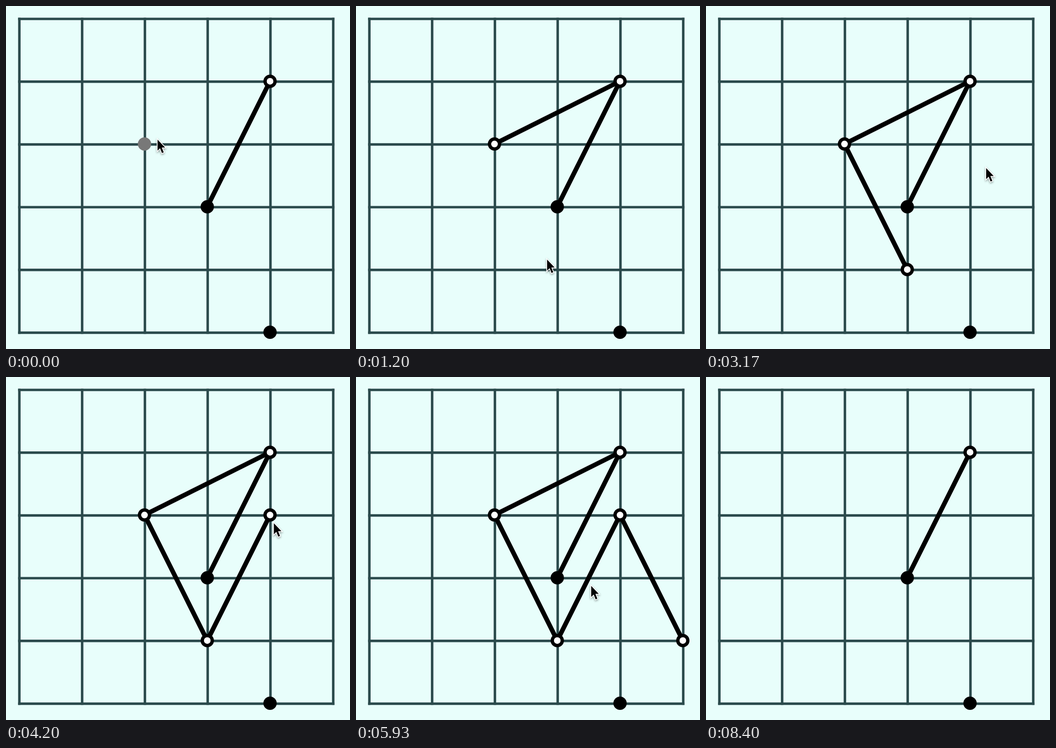
Write an HTML page with a canvas that moves like this. It is 749 px wide and 747 px high and loops after 8.71 s.

```html
<!DOCTYPE html>
<html lang="en">
<head>
<meta charset="utf-8">
<title>Knight path</title>
<style>
  html, body { margin: 0; width: 100%; height: 100%; overflow: hidden; background: #e8fefb; }
  canvas { display: block; }
</style>
</head>
<body>
<canvas id="stage" width="749" height="747"></canvas>
<script>
const ctx = document.getElementById('stage').getContext('2d');
const WIDTH = 749, HEIGHT = 747, LOOP = 8710;
const CELL = 136.68, DOT = 14.5, HOVER_LEAD = 250;
const COLORS = { back: '#e8fefb', grid: '#2b4a4c', hover: '#787878', undo: '#ff6b6b' };

const point = (x, y) => ({ x, y });
const node = (col, row) => point(28.2 + col * CELL, 27.2 + row * CELL);
const near = (p, dy = 3) => point(p.x + 1, p.y + dy);
const start = node(3, 3), first = node(4, 1), goal = node(4, 5);

// Moves light up shortly before the pointer arrives and are placed on click.
const moves = [
  { ...node(2, 2), arrive: 250, click: 420 },
  { ...node(3, 4), arrive: 1500, click: 1900 },
  { ...node(4, 2), arrive: 3670, click: 4000 },
  { ...node(5, 4), arrive: 5300, click: 5420 }
];
const undo = { arrive: 6980, click: 7330 };

// The pointer eases from stop to stop along arcs, resting in between.
const straight = point(0, 0);
const legs = [
  { leave: 0, arrive: moves[0].arrive, to: near(moves[0]), bend: straight },
  { leave: 450, arrive: moves[1].arrive, to: near(moves[1]), bend: point(6, 46) },
  { leave: 1930, arrive: moves[2].arrive, to: near(moves[2]), bend: point(96, -8) },
  { leave: 4030, arrive: moves[3].arrive, to: near(moves[3]), bend: point(3, 7) },
  { leave: 5700, arrive: 6000, to: point(481, 436), bend: straight },
  { leave: 6000, arrive: undo.arrive, to: near(first, 10), bend: straight },
  { leave: 7350, arrive: 7670, to: point(756, 74), bend: straight }
];
const pointerGone = legs[legs.length - 1].arrive;

function pointerAt(time) {
  let pos = point(330, 291);
  for (const { leave, arrive, to, bend } of legs) {
    if (time <= leave) break;
    const u = Math.min(1, (time - leave) / (arrive - leave));
    const s = u * u * (3 - 2 * u), arc = 4 * s * (1 - s);
    pos = point(pos.x + (to.x - pos.x) * s + bend.x * arc,
                pos.y + (to.y - pos.y) * s + bend.y * arc);
  }
  return pos;
}

function line(a, b, color, width) {
  ctx.strokeStyle = color;
  ctx.lineWidth = width;
  ctx.beginPath();
  ctx.moveTo(a.x, a.y);
  ctx.lineTo(b.x, b.y);
  ctx.stroke();
}

function disc(p, radius, color) {
  ctx.fillStyle = color;
  ctx.beginPath();
  ctx.arc(p.x, p.y, radius, 0, Math.PI * 2);
  ctx.fill();
}

function ring(p, fill) {
  disc(p, DOT, '#000');
  disc(p, DOT / 2, fill);
}

function drawGrid() {
  const width = 5.4, low = 29.1, high = low + 5 * CELL, half = width / 2;
  for (let at = low; at < high + 1; at += CELL) {
    line(point(at, low - 1 - half), point(at, high - 1 + half), COLORS.grid, width);
    line(point(low - half, at - 1), point(high + half, at - 1), COLORS.grid, width);
  }
}

const arrow = new Path2D('M0 0V24L5.4 18.8L9.6 29.3L13.4 27.7L9.2 17.3H16.4Z');

function drawPointer({ x, y }) {
  ctx.save();
  ctx.translate(x, y);
  ctx.shadowColor = 'rgba(0,0,0,.4)';
  ctx.shadowBlur = 4;
  ctx.shadowOffsetY = 2;
  ctx.strokeStyle = '#fff';
  ctx.lineWidth = 3.4;
  ctx.stroke(arrow);
  ctx.shadowColor = 'transparent';
  ctx.fillStyle = '#000';
  ctx.fill(arrow);
  ctx.restore();
}

function draw(time) {
  ctx.fillStyle = COLORS.back;
  ctx.fillRect(0, 0, WIDTH, HEIGHT);
  drawGrid();

  const isHovered = m => time >= m.arrive - HOVER_LEAD && time < m.click;
  const undoing = isHovered(undo);
  const placed = time < undo.click ? moves.filter(m => time >= m.click) : [];
  const preview = moves.find(isHovered);

  ctx.globalAlpha = undoing ? 0.87 : 1;
  placed.forEach((m, i) => line(i ? placed[i - 1] : first, m, undoing ? COLORS.undo : '#000', 10));
  ctx.globalAlpha = 1;
  line(start, first, '#000', 10);

  disc(start, DOT, '#000');
  disc(goal, DOT, '#000');
  ring(first, '#fff');
  placed.forEach(m => ring(m, undoing ? COLORS.undo : '#fff'));
  // The first preview is already lit when the loop begins.
  if (preview) disc(preview, DOT, COLORS.hover);
  if (time < pointerGone) drawPointer(pointerAt(time));
}

const begin = performance.now();
function tick() {
  draw((performance.now() - begin) % LOOP);
  requestAnimationFrame(tick);
}
tick();
</script>
</body>
</html>
```
